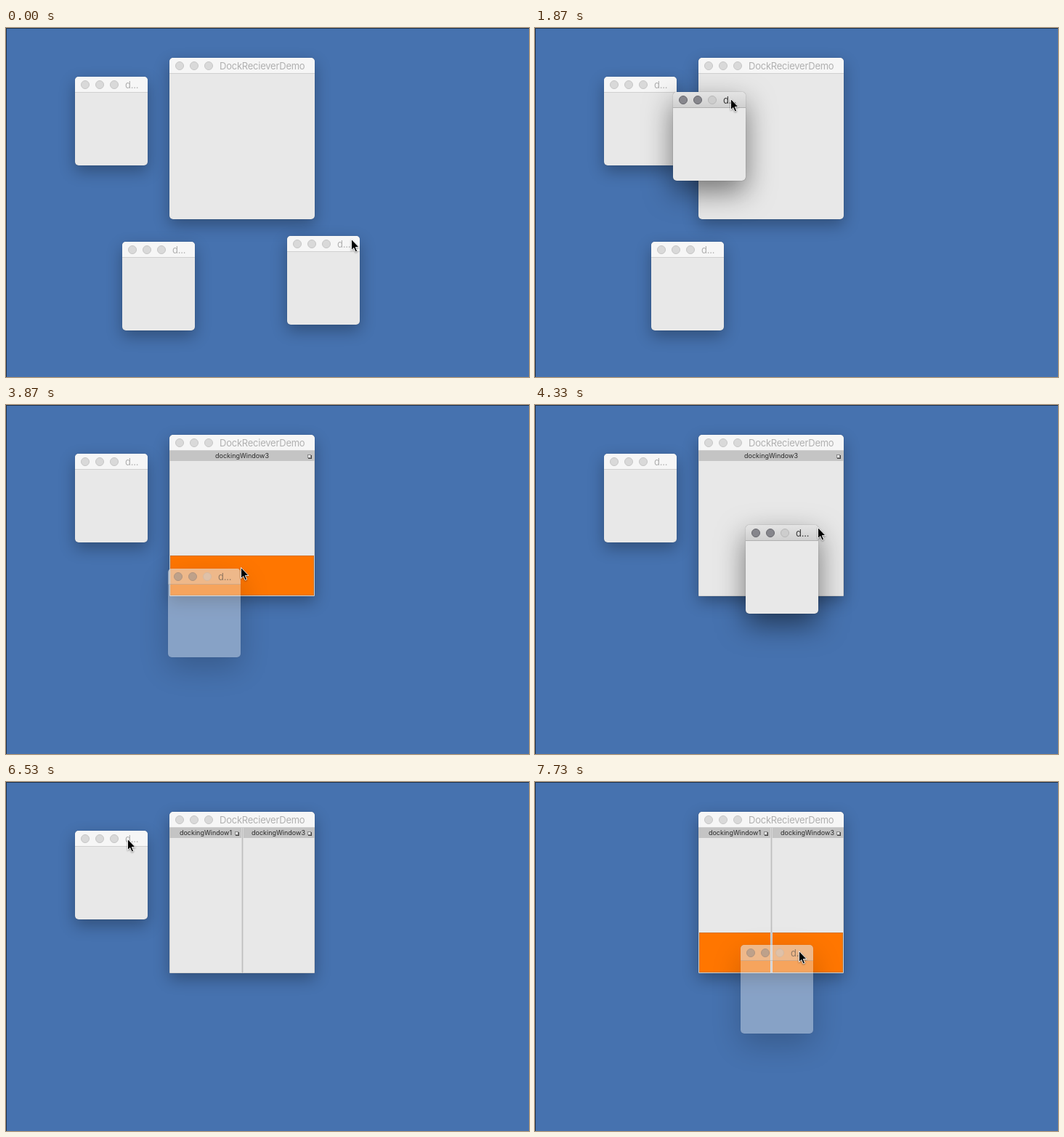
An HTML page for the animation above (8000 ms loop, 720 px wide and 480 px high).

```html
<!DOCTYPE html>
<html lang="en">
<head>
<meta charset="utf-8">
<title>Docking windows</title>
<style>
  html, body { margin: 0; width: 100%; height: 100%; overflow: hidden; }
  body { font-family: Inter, "Open Sans", sans-serif; background: #4672af; }
  #stage { position: relative; width: 720px; height: 480px; overflow: hidden; background: #4672af; }
  #edge { position: absolute; inset: 0; border: solid #1d3049; border-width: 1px 0 0 1px; }

  .win {
    position: absolute; left: 0; top: 0; width: 100px; height: 122px;
    border-radius: 5px; background: #e8e8e8;
    box-shadow: 0 0 1px rgba(0, 0, 0, .4), 0 8px 21px rgba(0, 0, 0, .3);
  }
  .win.active { box-shadow: 0 0 1px rgba(0, 0, 0, .6), 0 15px 38px rgba(0, 0, 0, .5); }
  .win.ghost {
    background: rgba(232, 232, 232, .4);
    box-shadow: 0 0 1px rgba(0, 0, 0, .25), 0 15px 40px rgba(0, 0, 0, .2);
  }
  #main { width: 200px; height: 222px; left: 225px; top: 41px; overflow: hidden; }
  #main.docked { border-radius: 5px 5px 2px 2px; }

  .bar {
    position: relative; box-sizing: border-box; height: 22px;
    border-radius: 5px 5px 0 0; border-bottom: 1px solid #d0d0d0; background: #f6f6f6;
    padding-left: 69px; font-size: 13px; line-height: 22px; letter-spacing: -.24px;
    color: #b0b0b0; white-space: nowrap;
  }
  .bar i {
    position: absolute; top: 5px; left: 8px; box-sizing: border-box;
    width: 12px; height: 12px; border-radius: 50%;
    background: #d9d9d9; border: 1px solid #c6c6c6;
  }
  .bar i:nth-of-type(2) { left: 28px; }
  .bar i:nth-of-type(3) { left: 48px; }
  .active .bar { background: linear-gradient(#e4e4e4, #d0d0d0); border-color: #b0b0b0; color: #3c3c3c; }
  .active .bar i { background: #86868c; border-color: #67676d; }
  .active .bar i:nth-of-type(3) { background: #cdcdcd; border-color: #b8b8b8; }
  .ghost .bar { background: rgba(222, 222, 222, .35); border-color: rgba(120, 120, 120, .25); color: rgba(60, 60, 60, .5); }
  .ghost .bar i { opacity: .45; }

  #zone { position: absolute; box-sizing: border-box; background: #ff7600; border: 1px dotted #a8703f; }
  #zone.top, #zone.bottom { left: 1px; width: 198px; height: 55px; }
  #zone.left, #zone.right { top: 22px; width: 54px; height: 199px; }
  #zone.top { top: 22px; }
  #zone.bottom { bottom: 1px; }
  #zone.left { left: 1px; }
  #zone.right { right: 1px; }

  #dock { position: absolute; inset: 22px 0 0; box-sizing: border-box; border: 1px solid #d0d0d0; border-top: 0; }
  .head {
    position: absolute; top: 0; left: -1px; width: 200px; height: 14px;
    background: #c4c4c4; color: #2a2a2a; font-size: 9px; line-height: 13px; text-align: center;
  }
  .head b {
    position: absolute; right: 5px; top: 5px; box-sizing: border-box; width: 5px; height: 5px;
    border: 1px solid #8a8a8a; background: #e6e6e6; box-shadow: 1px 1px 0 #444;
  }
  .split .head { width: 100px; }
  .split #head3 { left: 99px; }
  #divider {
    position: absolute; left: 98px; top: 0; width: 1px; height: 200px;
    background: #bebebe; border: solid #d8d8d8; border-width: 0 1px;
  }
  #cursor { position: absolute; left: 0; top: 0; overflow: visible; filter: drop-shadow(0 1px 1px rgba(0, 0, 0, .4)); }
</style>
</head>
<body>
<div id="stage">
  <div id="edge"></div>
  <div class="win" id="main">
    <div class="bar"><i></i><i></i><i></i>DockRecieverDemo</div>
    <div id="zone"></div>
    <div id="dock">
      <div class="head" id="head1">dockingWindow1<b></b></div>
      <div class="head" id="head3">dockingWindow3<b></b></div>
      <div id="divider"></div>
    </div>
  </div>
  <div class="win" id="winA"><div class="bar"><i></i><i></i><i></i>d...</div></div>
  <div class="win" id="winB"><div class="bar"><i></i><i></i><i></i>d...</div></div>
  <div class="win" id="winC"><div class="bar"><i></i><i></i><i></i>d...</div></div>
  <svg id="cursor" width="14" height="20">
    <path d="M.5 .5V15.6L3.8 12.5L6.2 18L8.6 16.9L6.3 11.6H11Z" fill="#000" stroke="#fff" stroke-width=".9" stroke-linejoin="round"/>
  </svg>
</div>
<script>
  const LOOP = 8000, TICK = 200 / 3;
  const LAG = TICK;         // a dragged window trails the pointer
  const SETTLE = 3 * TICK;  // a drop zone lights up after the pointer has stayed in it
  const ZONE = 55;
  const dockArea = { left: 225, top: 62, right: 425, bottom: 262 };
  const $ = id => document.getElementById(id);
  const show = (id, on) => { $(id).style.display = on ? '' : 'none'; };

  const windows = [
    { id: 'winA', x: 95, y: 67, grab: 6733, drop: LOOP, dock: LOOP },
    { id: 'winB', x: 160, y: 294, grab: 3400, drop: 5660, dock: 5990 },
    { id: 'winC', x: 387, y: 286, grab: 267, drop: 2590, dock: 2790 }
  ];

  // Turning points of the pointer: time, x, y.
  const turns = [
    [0, 475, 290], [267, 467, 294],
    [870, 412, 186], [1667, 229, 150], [1800, 270, 96], [1867, 269, 97], [2330, 279, 146],
    [2733, 279, 146], [3267, 247, 311], [3400, 250, 303],
    [4000, 344, 200], [4333, 389, 168], [4733, 382, 102], [5000, 350, 70], [5400, 279, 119],
    [5933, 279, 119], [6533, 167, 78], [6733, 175, 75],
    [7267, 309, 101], [7500, 350, 215], [7667, 363, 232], [LOOP, 363, 232]
  ];

  function pointer(t) {
    const i = Math.max(1, turns.findIndex(k => k[0] > t));
    const [t0, x0, y0] = turns[i - 1], [t1, x1, y1] = turns[i];
    const f = (t - t0) / (t1 - t0);
    return { x: Math.round(x0 + (x1 - x0) * f), y: Math.round(y0 + (y1 - y0) * f) };
  }

  // The nearest side of the dock area, if the pointer is close enough to it.
  function sideAt(t) {
    const { x, y } = pointer(t), { left, top, right, bottom } = dockArea;
    const gaps = { left: x - left, top: y - top, right: right - x, bottom: bottom - y };
    const side = Object.keys(gaps).reduce((a, b) => gaps[b] < gaps[a] ? b : a);
    return gaps[side] >= 0 && gaps[side] < ZONE ? side : '';
  }

  function zoneAt(t) {
    const dragging = windows.some(w => t >= w.grab && t < w.dock);
    const side = dragging ? sideAt(t) : '';
    return side === sideAt(t - SETTLE) ? side : '';
  }

  function windowAt(w, t) {
    const from = pointer(w.grab), to = pointer(Math.max(w.grab, t - LAG));
    return { x: w.x + to.x - from.x, y: w.y + to.y - from.y };
  }

  function place(id, { x, y }) {
    $(id).style.transform = `translate(${x}px, ${y}px)`;
  }

  function draw(now) {
    // The motion advances fifteen times a second.
    const t = Math.floor((now % LOOP + 4) / TICK) * TICK;
    const zone = zoneAt(t);
    const [, second, first] = windows;

    for (const w of windows) {
      const held = t >= w.grab && t < w.drop;
      place(w.id, windowAt(w, t));
      show(w.id, t < w.drop);
      $(w.id).classList.toggle('active', held);
      $(w.id).classList.toggle('ghost', held && zone !== '');
    }

    const docked = t >= first.dock, split = t >= second.dock;
    $('zone').className = zone;
    show('zone', zone);
    $('main').classList.toggle('docked', docked);
    $('main').classList.toggle('split', split);
    show('dock', docked);
    show('head1', split);
    show('divider', split);
    place('cursor', pointer(t));
  }

  const start = performance.now();
  function frame() {
    draw(performance.now() - start);
    requestAnimationFrame(frame);
  }
  frame();
</script>
</body>
</html>
```
